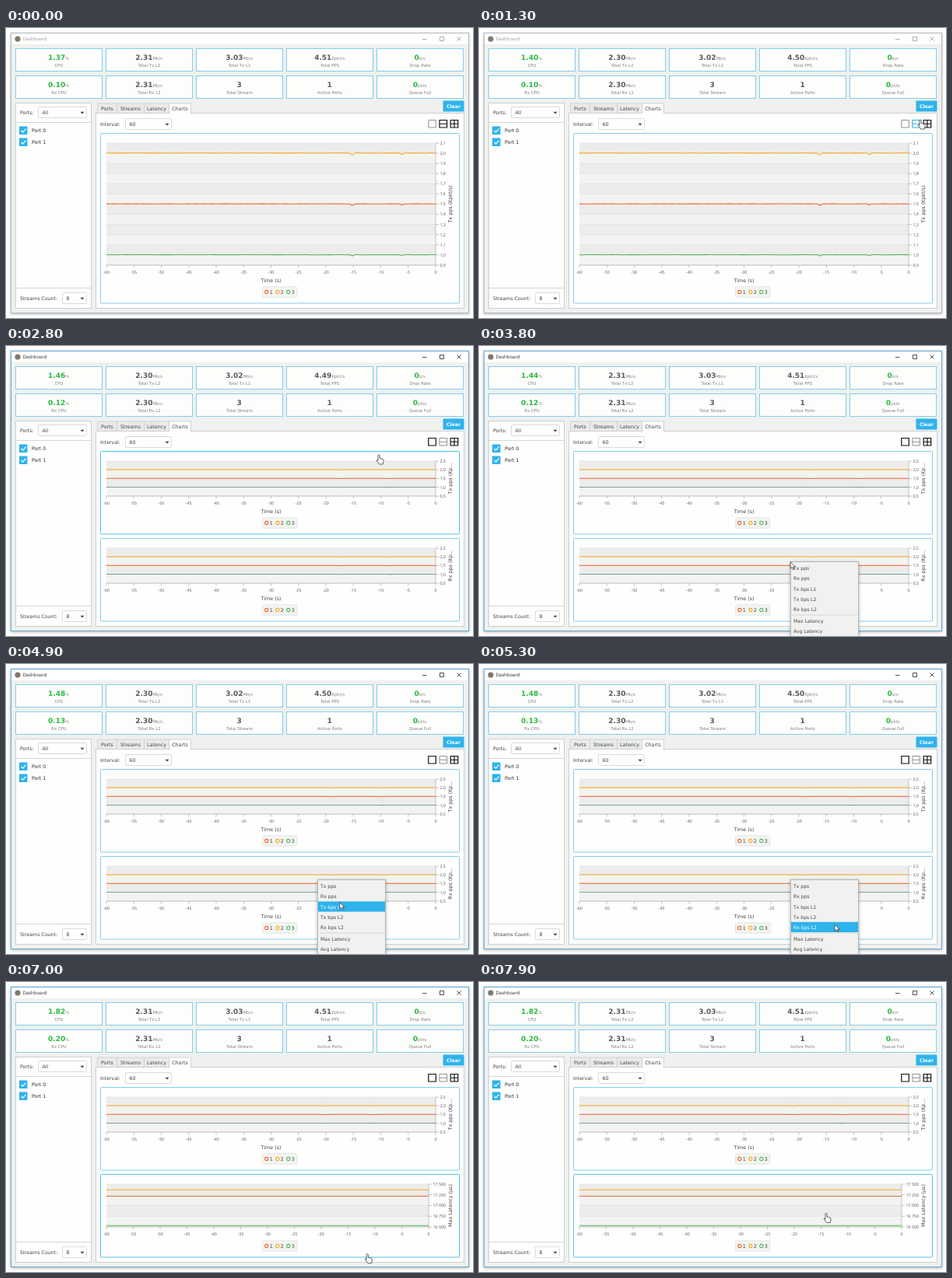
An HTML page for the animation above (8000 ms loop, 600 by 373 pixels).

```html
<!DOCTYPE html>
<html lang="en">
<head>
<meta charset="utf-8">
<title>Dashboard</title>
<style>
  html, body { margin: 0; width: 100%; height: 100%; overflow: hidden; background: #fff; }
  svg { display: block; width: 100vw; height: 100vh; font-family: "DejaVu Sans", sans-serif; text-rendering: geometricPrecision; }
  .thin { font-family: "Open Sans", sans-serif; }
  .bold { font-weight: bold; }
</style>
</head>
<body>
<svg id="stage" viewBox="0 0 600 373"></svg>
<script>
const LOOP = 8000, STEP = 100;
const BLUE = '#2fb3ec', EDGE = '#83cdef', GREEN = '#2aba40', GREY = '#5a5a5a', INK = '#444';
const SERIES = ['#f3622d', '#fba71b', '#57b757'];

// Counter refreshes: time, length of the chart shift, new values
const FIRST = ['1.37', '0.10', '2.31', '3.03', '4.51'];
const UPDATES = [
  [500, 900, ['1.40', '0.10', '2.30', '3.02', '4.50']],
  [2500, 400, ['1.46', '0.12', '2.30', '3.02', '4.49']],
  [2900, 400, ['1.44', '0.12', '2.31', '3.03', '4.51']],
  [4600, 900, ['1.48', '0.13', '2.30', '3.02', '4.50']],
  [5800, 300, ['1.50', '0.14', '2.30', '3.02', '4.49']],
  [7000, 900, ['1.82', '0.20', '2.31', '3.03', '4.51']]
];
// Pointer path: time, x, y
const PATH = [
  [400, 500, 360], [1300, 567, 118], [2400, 567, 118], [2800, 479, 140], [3300, 400, 278],
  [3400, 400, 277.5], [4500, 400.5, 278], [5300, 457, 335], [5400, 460, 348], [5500, 464, 362],
  [5600, 466, 367], [5700, 466, 367], [6000, 466.5, 355.5], [6900, 466.5, 355.5],
  [7800, 446, 303], [7900, 446, 297.5]
];
const MENU = [['Tx pps', 279], ['Rx pps', 292.2], ['Tx bps L1', 305.4], ['Tx bps L2', 318.6],
  ['Rx bps L2', 331.8], ['Max Latency', 346.5], ['Avg Latency', 359.8]];

const clamp = v => Math.max(0, Math.min(1, v));
const rect = (x, y, w, h, fill, stroke = 'none', more = '') =>
  `<rect x="${x}" y="${y}" width="${w}" height="${h}" fill="${fill}" stroke="${stroke}" ${more}/>`;
const path = (d, stroke, width = 1, fill = 'none', more = '') =>
  `<path d="${d}" stroke="${stroke}" stroke-width="${width}" fill="${fill}" ${more}/>`;
const text = (x, y, s, size = 6.2, fill = INK, more = '') =>
  `<text x="${x}" y="${y}" font-size="${size}" fill="${fill}" ${more}>${s}</text>`;
const MID = 'text-anchor="middle"', THIN = 'class="thin"', BOLD = 'class="bold"';

function pointer(t) {
  const i = PATH.findIndex(k => k[0] >= t);
  if (i < 0) return PATH[PATH.length - 1].slice(1);
  if (!i) return PATH[0].slice(1);
  const [t0, x0, y0] = PATH[i - 1], [t1, x1, y1] = PATH[i];
  const p = (t - t0) / (t1 - t0);
  return [x0 + (x1 - x0) * p, y0 + (y1 - y0) * p];
}

function combo(x, y, w, label) {
  const a = x + w - 8, b = y + 6.2;
  return rect(x, y, w, 14, '#fdfefd', '#d0d3d0', 'rx="1" stroke-width=".8"') +
    text(x + 5, y + 9.5, label, 6.3) + path(`M${a} ${b}h5l-2.5 2.8z`, 'none', 0, INK);
}

function titleBar(active) {
  const ink = active ? '#222' : '#999';
  return `<circle cx="15" cy="14" r="3.6" fill="#84786a"/>` +
    text(21.5, 16.2, 'Dashboard', 6, ink, THIN) +
    path('M535 14.5h5.5M557.5 11.5h5v5h-5zM579.5 11.5l5 5m0-5l-5 5', ink, .8);
}

function card(col, row, value, unit, label, green) {
  const x = 12.5 + Math.round(col * 116.1), y = 26.5 + row * 35;
  return rect(x, y, 111, 29, '#fdfefc', EDGE) +
    text(x + 55.2, y + 14.6, `${value}<tspan font-size="5.4" font-weight="normal" fill="#8a8a8a">${unit}</tspan>`,
      9, green ? GREEN : GREY, BOLD + MID) +
    text(x + 55.5, y + 23, label, 5.4, '#808080', MID);
}

function cards([cpu, rx, l2, l1, pps]) {
  return card(0, 0, cpu, '%', 'CPU', 1) + card(1, 0, l2, 'Mb/s', 'Total Tx L2') +
    card(2, 0, l1, 'Mb/s', 'Total Tx L1') + card(3, 0, pps, 'Kpkt/s', 'Total PPS') +
    card(4, 0, '0', 'b/s', 'Drop Rate', 1) + card(0, 1, rx, '%', 'Rx CPU', 1) +
    card(1, 1, l2, 'Mb/s', 'Total Rx L2') + card(2, 1, '3', '', 'Total Stream') +
    card(3, 1, '1', '', 'Active Ports') + card(4, 1, '0', 'pkts', 'Queue Full', 1);
}

function sidebar() {
  const check = (y, label) => rect(17, y, 10.5, 10.5, BLUE) +
    path(`M19.5 ${y + 5.3}l2.2 2.4l3.8-4.6`, '#fff', 1.2) +
    text(33, y + 7.8, label, 6.2, '#2a2a2a');
  return rect(12.5, 96.5, 97, 264, '#fdfefd', '#cdd0cd') +
    path('M13 121.5h96M13 334.5h96', '#d4d7d4') +
    text(18, 110.5, 'Ports:') + combo(41.5, 101.5, 62, 'All') +
    check(126.5, 'Port 0') + check(141.5, 'Port 1') +
    text(18, 350, 'Streams Count:') + combo(72.5, 340.5, 31, '8');
}

function tabs() {
  const tab = (x, w, s, on) => rect(x + .5, 97, w, 13, on ? '#fdfefd' : '#e9ebe8', '#cdd0cd', 'stroke-width=".9"') +
    text(x + w / 2 + .5, 106, s, 6.3, INK, MID);
  return tab(117, 25, 'Ports') + tab(142, 35, 'Streams') + tab(177, 32, 'Latency') +
    rect(115.5, 109.5, 473, 251, '#fdfefd', '#cdd0cd') + tab(209, 28, 'Charts', 1) +
    rect(210, 109, 27, 2, '#fdfefd') +
    rect(561.5, 93.5, 27, 14, BLUE, 'none', 'rx="1"') + text(575, 102.7, 'Clear', 6.2, '#fff', BOLD + MID) +
    text(121, 125.5, 'Interval:') + combo(153.5, 116.5, 59, '60');
}

function layoutIcons(split, hover) {
  const icon = (x, d, dim, hot) => path(`M${x} 118.5h9.5v9.5h-9.5z${d}`, hot ? BLUE : dim ? '#777' : '#111', dim ? .8 : 1.2);
  return icon(542.8, '', !split) + icon(557, 'm0 4.75h9.5', split, hover) +
    icon(571.2, 'm0 4.75h9.5m-4.75-4.75v9.5', false);
}

// One chart panel; `o` holds range, labels and a function giving each line's value
function chart(top, bottom, o, hot) {
  const L = 129, R = o.right || 552, T = top + 13, B = bottom - (o.noTime ? 39.5 : 49.5);
  const Y = v => B - .3 - (v - o.lo) / (o.hi - o.lo) * (B - T), unit = (R - L) / 60;
  const rows = Math.round((o.hi - o.lo) / o.step), h = (B - T) / rows;
  let s = rect(121.5, top + .5, 461, bottom - top - 1, '#fdfefd', hot ? '#55bff0' : EDGE, 'rx="1"');
  for (let i = 0; i <= rows; i++) {
    const y = T + i * h;
    if (i < rows) s += rect(L, y, R - L, h, i % 2 ? '#f2f4f2' : '#ecedeb');
    s += path(`M${L} ${y}H${R}`, '#dcdedb', .7) + path(`M${R} ${y}h4`, '#aaa', .7) +
      text(R + 5.5, y + 1.9, o.format(o.hi - i * o.step), 5.3, '#555', THIN);
  }
  s += path(`M${L} ${B}H${R}V${T}`, '#b5b8b5', .8);
  for (let i = 0; i <= 12; i++) {
    const x = L + i * unit * 5;
    s += path(`M${x} ${B}v3.5`, '#aaa', .7) +
      text(x, B + 10.6, i * 5 - 60, 5.3, '#555', THIN + MID);
  }
  // two samples per second
  for (let k = 0; k < 3; k++) {
    let d = '';
    for (let j = 0; j < 140; j++) {
      const x = L + (j / 2 - o.shift - .18) * unit;
      if (x < L - unit || x > R + unit) continue;
      d += `${d ? 'L' : 'M'}${x.toFixed(2)} ${Y(o.value(k, j)).toFixed(2)}`;
    }
    s += path(d, k == 2 && o.third || SERIES[k], 1.05, 'none', `clip-path="url(#${o.right ? 'narrow' : 'wide'})"`);
  }
  const mid = (T + B) / 2;
  s += text(572.8, mid, o.title, 6.4, INK, `${MID} transform="rotate(-90 572.8 ${mid})"`);
  if (!o.noTime) s += text((L + R) / 2, bottom - 28, 'Time (s)', 6.4, INK, MID);
  s += rect(329.5, bottom - 21.8, 44.5, 13.6, '#f2f4f1', '#e1e3e0', 'rx="2" stroke-width=".8"');
  SERIES.forEach((c, k) => {
    const x = 334.8 + k * 14;
    s += `<circle cx="${x}" cy="${bottom - 15}" r="2.1" fill="#fff" stroke="${c}" stroke-width="1.1"/>` +
      text(x + 4, bottom - 12.7, k + 1, 6.4);
  });
  return s;
}

function rate(k, j) {
  const dip = j == 90 ? 1 : j == 108 ? .65 : 0;
  return [1.5, 2, 1][k] * (1 - .0115 * dip) + .001 * Math.sin(j * j + k);
}

function charts(t, shift, [px, py]) {
  const hand = t >= 500 && (t < 3700 || t >= 6800);
  const over = (a, b) => hand && px < 583 && py > a && py < b;
  const comma = v => v.toFixed(1).replace('.', ',');
  const base = { shift, format: comma, value: rate };
  if (t < 2100)
    return chart(135, 354.5, { ...base, lo: .9, hi: 2.1, step: .1, title: 'Tx pps (Kpkt/s)' }, over(135, 355));
  const half = { ...base, lo: .5, hi: 2.5, step: .5, third: '#7da097' };
  const lower = t < 6800 ? { ...half, title: 'Rx pps (Kp...' } : {
    shift, right: 543, noTime: true, lo: 16500, hi: 17500, step: 250, title: 'Max Latency (µs)',
    format: v => `${v / 1000 | 0} ${String(v % 1000).padStart(3, '0')}`,
    value: k => [17212, 17362, 16525][k]
  };
  return chart(135, 242.5, { ...half, title: 'Tx pps (Kp...' }, over(135, 242)) +
    chart(247, 354.5, lower, over(247, 355));
}

function menu(y) {
  let s = rect(400.5, 277.5, 87, 110, '#f1f2f0', '#b4b7b4', 'filter="url(#soft)"') +
    path('M402 346h84', '#cfd1ce', .8);
  for (const [label, top] of MENU) {
    const on = y >= top && y < top + 13.2 && y > 280;
    if (on) s += rect(401, top, 86, 13.2, BLUE);
    s += text(404, top + 9.1, label, 6.1, on ? '#fff' : INK);
  }
  return s;
}

function cursor(x, y, arrow) {
  const d = arrow ? 'M0 0V8.6L2 6.8L3.4 10L4.8 9.4L3.4 6.3H6.2Z'
    : 'M0 0q1.1 0 1.1 1v3.6l4 1q1.3.4 1.1 1.8l-.8 4.6h-4.8l-3.3-4.5q-.4-1 .7-1l1 .9v-6.4q0-1 1-1z';
  return path(d, '#222', .7, '#fff', `transform="translate(${x} ${y})"`);
}

function draw(t) {
  const active = t >= 1900, open = t >= 3700 && t < 6800;
  const done = UPDATES.filter(u => u[0] <= t).pop();
  const shift = UPDATES.reduce((n, [at, span]) => n + clamp((t - at + STEP) / span), 0);
  const pos = pointer(t);
  return `<defs>
    <filter id="soft" x="-10%" y="-10%" width="120%" height="120%">
      <feDropShadow dx="0" dy="1" stdDeviation="${active ? 2 : 1.4}" flood-opacity=".3"/></filter>
    <clipPath id="wide"><rect x="129" y="130" width="423" height="230"/></clipPath>
    <clipPath id="narrow"><rect x="129" y="130" width="414" height="230"/></clipPath></defs>` +
    rect(6.5, 6.5, 588, 360, '#eff1ee', active ? '#5fa9d3' : '#b3b9bc', 'filter="url(#soft)"') +
    rect(7, 7, 587, 14, '#fff') + titleBar(active) +
    cards(done ? done[2] : FIRST) + sidebar() + tabs() +
    layoutIcons(t >= 2100, t >= 1300 && t < 2100) + charts(t, shift, pos) +
    (open ? menu(pos[1]) : '') + (t >= 500 ? cursor(...pos, open) : '');
}

const stage = document.getElementById('stage');
let shown = -1;
function tick() {
  const t = Math.floor(performance.now() % LOOP / STEP) * STEP;
  if (t !== shown) stage.innerHTML = draw(shown = t);
  requestAnimationFrame(tick);
}
tick();
</script>
</body>
</html>
```
